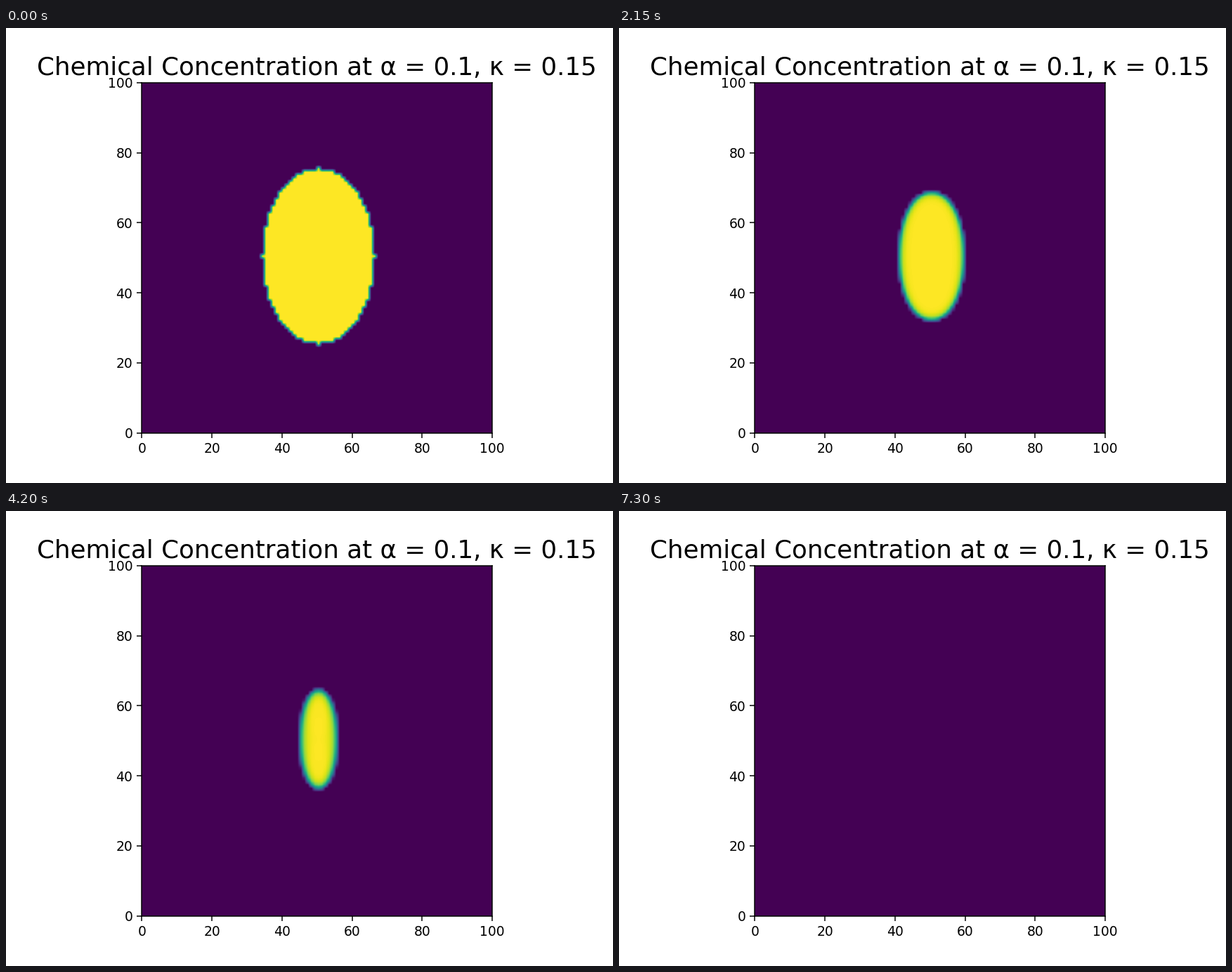
Animation, 864 px wide and 648 px high, one loop 8 s. Source, as a matplotlib script:

```python
import numpy as np
import matplotlib.pyplot as plt
from matplotlib.animation import FuncAnimation

DPI = 135
FRAMES, INTERVAL = 160, 50
SIZE, CENTRE = 100, 50

# Half-axes of the dissolving ellipse, in cells, over time in frames.
TIMES = [0, 12, 18, 35, 52, 69, 86, 103, 120, 137, 146]
HALF_X = [16, 13.1, 12.5, 10.5, 8.9, 7.4, 5.7, 4.5, 2.8, 1.5, 0]
HALF_Y = [25, 22.3, 21.6, 19.6, 17.7, 16.4, 14.4, 12.4, 9.7, 6.3, 0]

row, col = np.mgrid[:SIZE, :SIZE]
dx, dy = np.abs(col - CENTRE), np.abs(row - CENTRE)


def concentration(frame):
    """Field that is 1 deep inside the ellipse and falls to 0 at its rim."""
    a, b = (np.interp(frame, TIMES, half) for half in (HALF_X, HALF_Y))
    if a <= 0:
        return np.zeros((SIZE, SIZE))
    if frame == 0:
        return ((dx / a) ** 2 + (dy / b) ** 2 <= 1).astype(float)

    power = 2 + 0.15 * min(frame / 30, 1)
    level = ((dx / a) ** power + (dy / b) ** power) ** (1 / power)
    safe = np.maximum(level, 1e-6)
    slope = np.hypot((dx / a / safe) ** (power - 1) / a,
                     (dy / b / safe) ** (power - 1) / b)
    depth = (1 - level) / np.maximum(slope, 1 / b)
    depth = np.minimum(depth, a * np.sqrt(np.clip(1 - level ** 2, 0, 1)))

    width = 0.105 * np.sqrt(frame)
    return 1 - np.exp(-np.maximum(depth, 0) / width)


plt.rcParams["font.family"] = "DejaVu Sans"
fig, ax = plt.subplots(figsize=(864 / DPI, 648 / DPI), dpi=DPI)
image = ax.imshow(concentration(0), cmap="viridis", vmin=0, vmax=1,
                  origin="lower", extent=(0, SIZE, 0, SIZE),
                  interpolation="bilinear")
ax.set_title("Chemical Concentration at α = 0.1, κ = 0.15", fontsize=19)


def update(frame):
    image.set_data(concentration(frame))
    return [image]


anim = FuncAnimation(fig, update, frames=FRAMES, interval=INTERVAL,
                     repeat=True, repeat_delay=0)
plt.show()
```
